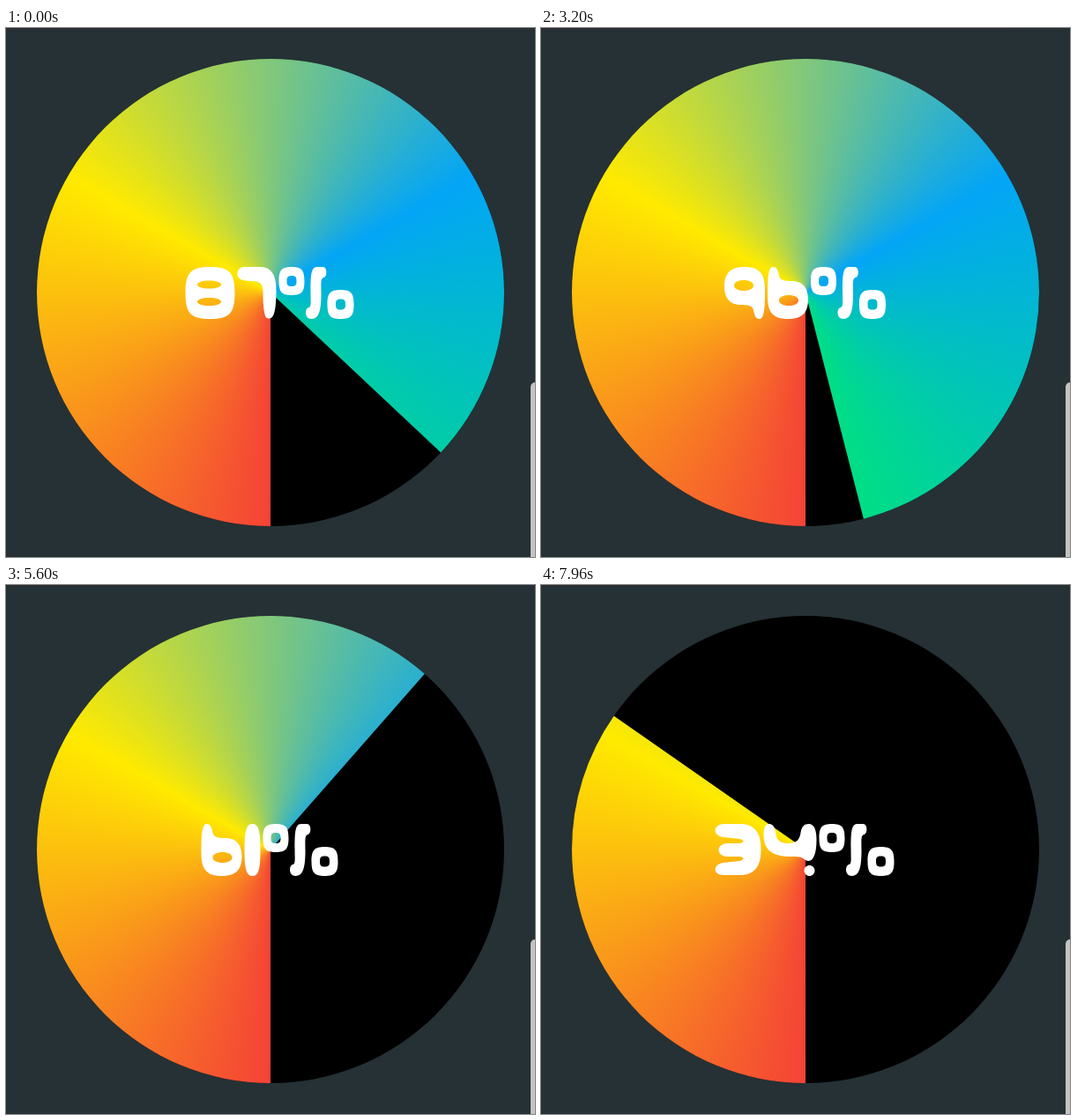
Write an HTML page with a canvas that moves like this. It is 600 px wide and 600 px high and loops after 8 s.

```html
<!DOCTYPE html>
<html lang="en">
<head>
<meta charset="utf-8">
<title>Percentage dial</title>
<style>
  html, body { margin: 0; width: 100%; height: 100%; overflow: hidden; background: #253135; }
  canvas { display: block; width: 600px; height: 600px; }
</style>
</head>
<body>
<canvas id="stage" width="600" height="600"></canvas>
<script>
const ctx = document.getElementById('stage').getContext('2d');
const LOOP = 8000, STEP = 40, CENTER = 300, RADIUS = 265;
const FIRST_VALUE = 87;

// Squarish oval; a larger bulge gives fuller corners.
function oval(cx, cy, rx, ry, bulge = 0.78) {
  const l = cx - rx, r = cx + rx, t = cy - ry, b = cy + ry;
  const kx = rx * bulge, ky = ry * bulge;
  return `M${cx} ${t}C${cx + kx} ${t} ${r} ${cy - ky} ${r} ${cy}` +
    `C${r} ${cy + ky} ${cx + kx} ${b} ${cx} ${b}` +
    `C${cx - kx} ${b} ${l} ${cy + ky} ${l} ${cy}` +
    `C${l} ${cy - ky} ${cx - kx} ${t} ${cx} ${t}Z`;
}

function glyph(width, outline, transform) {
  const path = new Path2D();
  path.addPath(new Path2D(outline), transform);
  return { width, path };
}

const FIVE = 'M8 44H19C27 44 30 39 30 31C30 9 37 0 55 0H70C79 0 79 12 70 14' +
  'L60 15C52 16 51 21 51 29C51 48 43 58 25 58H9C-3 58-3 46 8 44Z';
const SIX = 'M6 0C11 0 12 5 13 10C14 15 19 16 27 16C41 16 46 25 46 37' +
  'C46 52 39 59 23 59C6 59 0 51 0 34C0 18 0 0 6 0Z' + oval(24, 38, 11, 6, 0.6);

const GLYPHS = {
  0: glyph(63, oval(31.5, 29.5, 31.5, 29.5) + oval(32, 29.5, 15, 16)),
  1: glyph(18, oval(9, 29.5, 9, 29.5, 0.75)),
  2: glyph(77, FIVE, new DOMMatrix([-1, 0, 0, 1, 77, 0])),
  3: glyph(52, 'M10 0H28C45 0 52 10 52 29S45 58 28 58H10C-3 58-3 46 9 44L28 42Q36 39 28 37' +
    'H13C1 36 1 23 13 22H28Q36 20 28 17L9 15C-3 13-3 1 10 0Z'),
  4: glyph(60, 'M6 0C12 0 13 6 14 12C15 19 20 22 28 22C38 22 41 17 42 10C43 3 46 0 51 0' +
    'C58 0 60 8 60 18C60 32 57 42 51 42C46 42 46 37 36 37C10 38 0 30 0 12C0 4 2 0 6 0Z' +
    oval(52, 53, 6, 6, 0.56)),
  5: glyph(77, FIVE),
  6: glyph(46, SIX),
  7: glyph(44, 'M8 0H26C40 0 44 12 44 26C44 40 43 49 41 54C39 60 32 60 31 54C29 46 29 36 29 28' +
    'C29 20 26 16 16 16C6 16 0 14 0 8C0 3 3 0 8 0Z'),
  8: glyph(56, oval(28, 29.5, 28, 29.5) + oval(27, 20, 13.5, 4.5, 0.6) + oval(27, 39.5, 13.5, 4.5, 0.6)),
  9: glyph(47, SIX, new DOMMatrix([-1, 0, 0, -1, 47, 59])),
  '%': glyph(85, oval(14.5, 16, 14.5, 16) + oval(14.5, 16, 5.5, 6) +
    'M43 0H50C55 0 55 11 51 12C47 13 48 18 48 30C48 48 46 59 37 59C29 59 29 47 34 46' +
    'C37 45 36 40 36 28C36 12 36 0 43 0Z' +
    oval(70, 42.5, 15, 16.5) + oval(70, 42.5, 5.5, 6))
};

const sineInOut = p => (1 - Math.cos(p * Math.PI)) / 2;
const sineIn = p => 1 - Math.cos(p * Math.PI / 2);

const MOVES = [
  { start: 60, to: 53.8 },
  { start: 1220, to: 31.2 },
  { start: 2280, to: 96 },
  { start: 3380, to: 61.1 },
  { start: 4410, to: 66 },
  { start: 5351, to: 30.2, duration: 769, ease: sineIn },
  { start: 6420, to: 52 },
  { start: 7580, to: 4.6 }
];

function valueAt(time) {
  let value = FIRST_VALUE;
  for (const { start, to, duration = 920, ease = sineInOut } of MOVES) {
    if (time < start) break;
    value += (to - value) * ease(Math.min(1, (time - start) / duration));
  }
  return value;
}

const rainbow = ctx.createConicGradient(Math.PI / 2, CENTER, CENTER);
['#f44336', '#ffea00', '#03a5f6', '#00e676'].forEach((color, i) => rainbow.addColorStop(i / 3, color));

function drawSector(percent, fill) {
  ctx.beginPath();
  ctx.moveTo(CENTER, CENTER);
  ctx.arc(CENTER, CENTER, RADIUS, Math.PI / 2, Math.PI / 2 + percent / 100 * Math.PI * 2);
  ctx.fillStyle = fill;
  ctx.fill();
}

function drawLabel(text) {
  const gap = 3;
  const glyphs = [...text].map(char => GLYPHS[char]);
  const width = glyphs.reduce((sum, g) => sum + g.width + gap, -gap);
  ctx.save();
  ctx.translate(299 - width / 2, 271);
  ctx.fillStyle = '#fff';
  for (const g of glyphs) {
    ctx.fill(g.path, 'evenodd');
    ctx.translate(g.width + gap, 0);
  }
  ctx.restore();
}

function drawBackdrop() {
  ctx.fillStyle = '#253135';
  ctx.fillRect(0, 0, 600, 600);
  ctx.fillStyle = '#2d2e30';
  ctx.fillRect(0, 0, 545, 1);
  ctx.fillStyle = '#c2c4c4';
  ctx.beginPath();
  ctx.roundRect(595, 402, 20, 220, 5);
  ctx.fill();
}

function draw(now) {
  const time = Math.floor(now % LOOP / STEP) * STEP;
  const value = valueAt(time);
  drawBackdrop();
  drawSector(100, '#000');
  drawSector(value, rainbow);
  drawLabel(Math.floor(value) + '%');
}

let origin;
function tick(now) {
  origin ??= now;
  draw(now - origin);
  requestAnimationFrame(tick);
}
draw(0);
requestAnimationFrame(tick);
</script>
</body>
</html>
```
